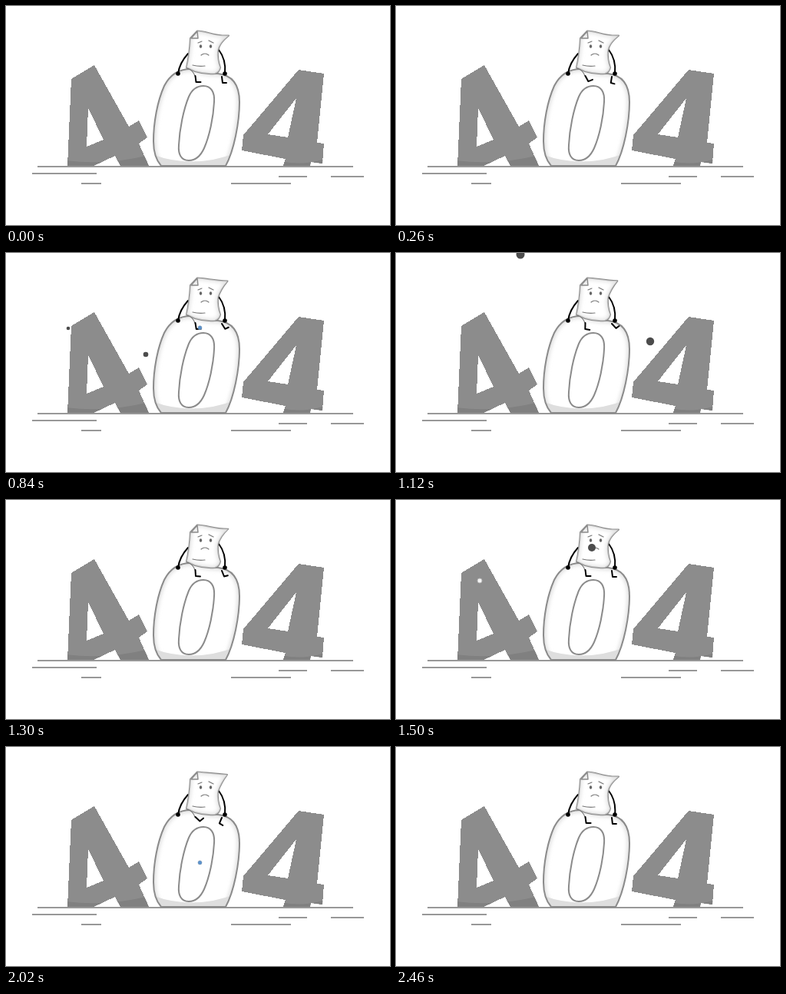
Recreate the animation shown at these times as an HTML page. Size 500 by 285 pixels, loop 2.5 s.

```html
<!DOCTYPE html>
<html lang="en">
<head>
<meta charset="utf-8">
<title>404</title>
<style>
html, body { margin: 0; width: 100%; height: 100%; overflow: hidden; background: #fff; }
svg { display: block; width: 500px; height: 285px; }
.edge { stroke: #8b8b8b; stroke-width: 2; stroke-linejoin: round; }
.limb { fill: none; stroke: #000; stroke-width: 2; stroke-linecap: round; stroke-linejoin: round; }
.face { fill: none; stroke: #777; stroke-width: 1.2; stroke-linecap: round; }
</style>
</head>
<body>
<svg viewBox="0 0 500 285">
  <defs>
    <filter id="soft" x="-20%" y="-20%" width="140%" height="140%"><feGaussianBlur stdDeviation="2.5"/></filter>
    <path id="zero" d="M202 208C195 200 192 188 192 176C192 152 197 124 206 104C214 88 227 81 244 82C254 87 264 88 276 88C296 90 304 104 304 125C304 151 297 188 286 208Z"/>
    <path id="hole" d="M257 104C267 104 272 112 271 125C270 145 265 169 258 185C253 196 246 201 238 201C228 201 224 193 225 181C226 160 231 135 238 118C242 109 248 104 257 104Z"/>
    <path id="left4" d="M115 77L160 157L173 149L184 171L173 179L186 208H149L142 195L114 208H80L85 95ZM107 133L105 183L127 174Z"/>
    <path id="right4" d="M381 83L414 88L405 178L414 179L412 205L397 203L396 208H361L364 199L307 188L309 168ZM378 120L341 167L367 171Z"/>
    <clipPath id="zeroClip"><use href="#zero"/></clipPath>
    <clipPath id="leftClip"><use href="#left4"/></clipPath>
    <clipPath id="rightClip"><use href="#right4"/></clipPath>
    <clipPath id="pageClip"><path id="pageMask"/></clipPath>
  </defs>
  <path d="M41 209H452M34 218H118M98 231H124M293 231H371M355 222H392M423 222H466" stroke="#777" stroke-width="1.4"/>
  <g fill="#8c8c8c" fill-rule="evenodd" shape-rendering="crispEdges">
    <use href="#left4"/><use href="#right4"/>
  </g>
  <path clip-path="url(#leftClip)" d="M70 200Q130 209 190 193V210H70Z" fill="#808080"/>
  <path clip-path="url(#rightClip)" d="M355 201Q385 209 415 199V210H355Z" fill="#808080"/>
  <use href="#zero" fill="#fff"/>
  <g clip-path="url(#zeroClip)">
    <use href="#zero" fill="none" stroke="#dedede" stroke-width="6" filter="url(#soft)"/>
    <path d="M190 193Q244 213 300 191V210H190Z" fill="#dedede"/>
  </g>
  <use href="#zero" class="edge" fill="none"/>
  <use href="#hole" class="edge" fill="#fff"/>
  <path class="limb" d="M237 62Q226 74 224 88M277 57Q287 70 285 88"/>
  <circle cx="224" cy="88" r="2.8"/><circle cx="285" cy="88" r="2.8"/>
  <path id="page" class="edge" fill="#fff"/>
  <g clip-path="url(#pageClip)"><path id="pageGlow" fill="none" stroke="#e2e2e2" stroke-width="5" filter="url(#soft)"/></g>
  <path class="edge" style="stroke-width:1.5" fill="#eee" d="M241 42L249 33L250 42Z"/>
  <path class="face" d="M243 77Q251 79 259 78M236 81Q243 83 246 91"/>
  <path class="face" d="M250 48L255 46M264 45L270 48M254 64Q259 60 264 64"/>
  <ellipse cx="253.5" cy="52.5" rx="1.7" ry="2.3" fill="#666"/>
  <ellipse cx="266.5" cy="52.5" rx="1.7" ry="2.3" fill="#666"/>
  <path id="legL" class="limb" d="M0 0L1 8H7"/>
  <path id="legR" class="limb" d="M0 0L1 8H6"/>
  <circle id="tear" r="2.5" fill="#5b93cf" stroke="#718ba5" stroke-width=".5"/>
  <g id="dots"></g>
</svg>
<script>
const LOOP = 2500, BEAT = 500, POP = 340;
const $ = id => document.getElementById(id);

// one pose per beat: page curl, left and right leg swing in degrees
const rest = [1, 0, 0], swingIn = [1, -40, 30], swingOut = [0, 10, -42];
const poses = [rest, swingIn, swingOut, rest, [0, -40, 30], rest];

// peak time, x, y, radius
const dark = [
  [520, 160, 51, 2], [840, 81, 98, 2.3], [840, 182, 132, 3.3],
  [1120, 162, 2, 5.5], [1120, 331, 115, 5.2], [1500, 255, 62, 5]
];
const light = [[520, 320, 122, 3.3], [1500, 109, 105, 3]];

function addDot([peak, x, y, r], fill, stroke) {
  const el = document.createElementNS("http://www.w3.org/2000/svg", "circle");
  for (const [key, value] of Object.entries({ cx: x, cy: y, fill, stroke })) el.setAttribute(key, value);
  $("dots").append(el);
  return { el, peak, r };
}
const dots = [
  ...dark.map(d => addDot(d, "#4c4c4c", "none")),
  ...light.map(d => addDot(d, "#f5f5f5", "#bbb"))
];

function poseAt(t) {
  const i = Math.floor(t / BEAT), p = t / BEAT - i, e = p * p * (3 - 2 * p);
  return poses[i].map((v, k) => v + (poses[i + 1][k] - v) * e);
}

function drawPage(curl) {
  const x = 288 + 2 * curl, y = 36 + 2.5 * curl;
  const d = `M249 32.5C262 ${33.5 - curl} 270 ${34.5 + 5 * curl} ${x} ${y}`
    + `Q${280 - 2 * curl} ${47 + curl} 276 58Q275 69 279 80`
    + `Q278 86 272 88Q259 89 246 85L235 80Q239 62 240 42Z`;
  for (const id of ["page", "pageGlow", "pageMask"]) $(id).setAttribute("d", d);
}

function drawTear(t) {
  const age = t - (t < 1300 ? 500 : 1544), fall = Math.max(0, age - 70);
  const size = age < 0 || age > 575 ? 0 : Math.min(1, 0.4 + age / 120);
  $("tear").setAttribute("transform", `translate(252.5 ${55 + 5.76e-4 * fall * fall}) scale(${size})`);
}

function frame(now) {
  const t = now % LOOP;
  const [curl, left, right] = poseAt(t);
  drawPage(curl);
  $("legL").setAttribute("transform", `translate(246.5 91) rotate(${left})`);
  $("legR").setAttribute("transform", `translate(281 92) rotate(${right})`);
  drawTear(t);
  for (const { el, peak, r } of dots) {
    const p = (t - peak) / POP;
    const size = Math.abs(p) < 0.5 ? r * Math.cos(Math.PI * p) : 0;
    el.setAttribute("r", size);
    el.setAttribute("visibility", size ? "visible" : "hidden");
  }
  requestAnimationFrame(frame);
}
frame(performance.now());
</script>
</body>
</html>
```
